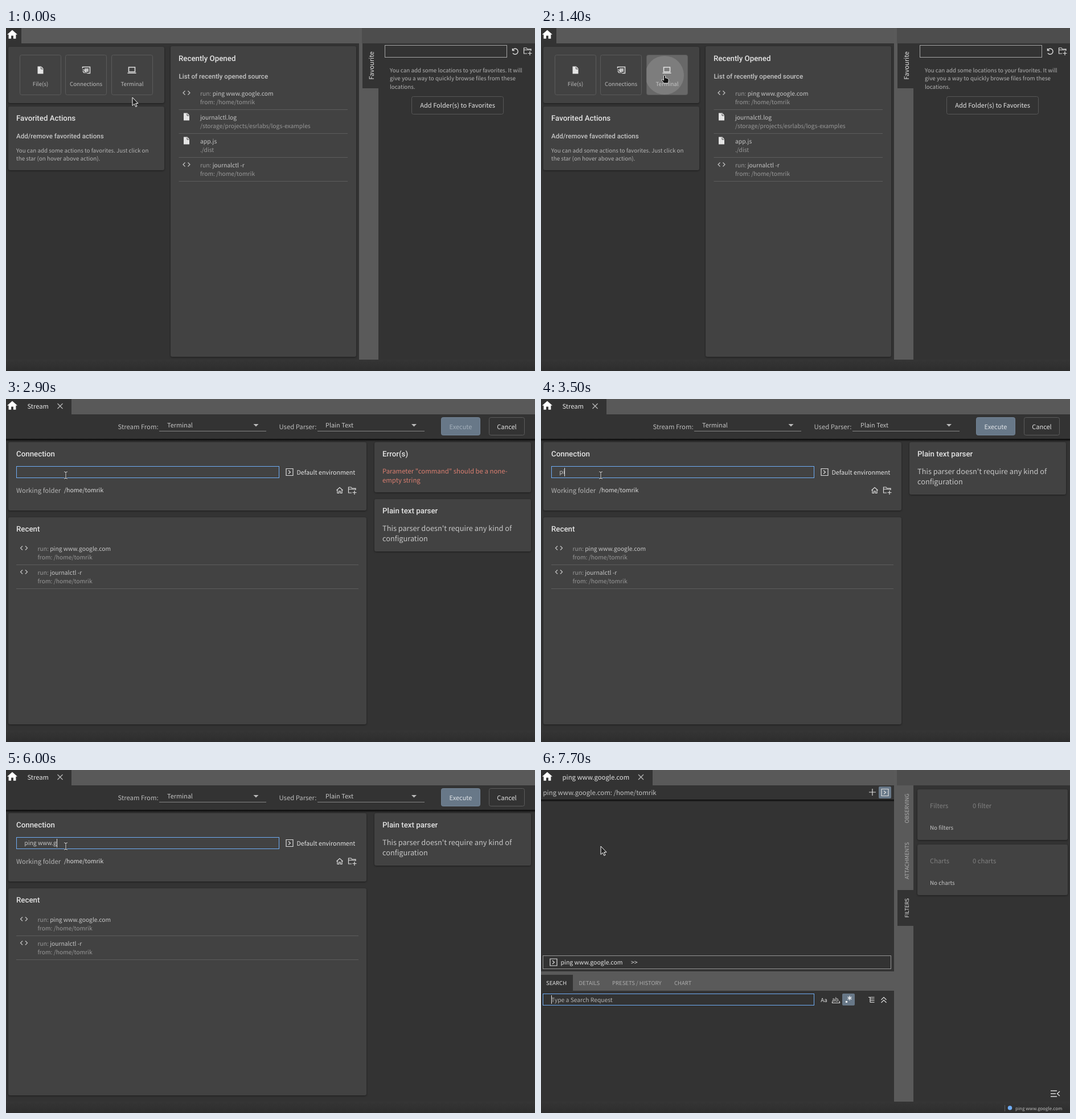
Recreate the animation shown at these times as an HTML page. Size 929 by 603 pixels, loop 8000 ms.

```html
<!DOCTYPE html>
<html lang="en">
<head>
<meta charset="utf-8">
<title>Terminal stream</title>
<style>
  html, body { margin: 0; width: 100%; height: 100%; overflow: hidden; background: #333; }
  svg { display: block; width: 929px; height: 603px; }
  text { font-family: "Noto Sans CJK JP", "Noto Sans CJK SC", "Noto Sans", sans-serif; white-space: pre; text-rendering: geometricPrecision; }
  .head { font-family: Roboto, sans-serif; font-weight: 500; }
  .card { fill: #424242; filter: drop-shadow(0 1px 1.5px rgba(0, 0, 0, .45)); }
  .icon { fill: none; stroke: #ddd; stroke-width: 1.2; }
</style>
</head>
<body>
<svg id="stage" viewBox="0 0 929 603"></svg>
<script>
const stage = document.getElementById('stage');
const FOLDER = '/home/tomrik', COMMAND = 'ping www.google.com';
const BRIGHT = '#e4e4e4', PLAIN = '#c6c6c6', MUTED = '#989898', BAR = '#595959', DARK = '#333', BLUE = '#6fadf5';

// Drawing helpers: each returns SVG markup.
const text = (x, y, size, fill, content, attrs = '') =>
  `<text x="${x}" y="${y}" font-size="${size}" fill="${fill}" ${attrs}>${content}</text>`;
const head = (x, y, content, size = 13.3, fill = BRIGHT) => text(x, y, size, fill, content, 'class="head"');
const middle = (x, y, size, fill, content) => text(x, y, size, fill, content, 'text-anchor="middle"');
const upright = (y, size, fill, content) =>
  text(0, 0, size, fill, content, `text-anchor="middle" transform="translate(645.5 ${y}) rotate(-90)"`);
const rect = (x, y, right, bottom, fill, attrs = '') =>
  `<rect x="${x}" y="${y}" width="${right - x}" height="${bottom - y}" fill="${fill}" ${attrs}/>`;
const frame = (x, y, right, bottom, stroke, fill = 'none', attrs = '') =>
  rect(x + .5, y + .5, right - .5, bottom - .5, fill, `stroke="${stroke}" ${attrs}`);
const card = (x, y, right, bottom) => rect(x, y, right, bottom, '#424242', 'class="card" rx="3"');
const line = (x, y, right, stroke = '#5d5d5d') => `<path d="M${x} ${y}H${right}" stroke="${stroke}"/>`;
const icon = (x, y, d, attrs = '') => `<path class="icon" transform="translate(${x} ${y})" d="${d}" ${attrs}/>`;
const solid = (x, y, d, fill = BRIGHT) => `<path transform="translate(${x} ${y})" d="${d}" fill="${fill}"/>`;
const group = (id, content) => `<g id="${id}">${content}</g>`;

const angles = (x, y) => icon(x, y, 'M-2.5 -3.5L-6 0L-2.5 3.5M2.5 -3.5L6 0L2.5 3.5', 'style="stroke:#c4c4c4"');
const page = (x, y, scale = 1) =>
  `<g transform="translate(${x} ${y}) scale(${scale})">${solid(0, 0, 'M-5 -6.5H1.5L5 -2.8V6.5H-5Z')}<path d="M1 -5.5V-2H4.5" fill="none" stroke="#424242"/></g>`;
const folderPlus = (x, y) => icon(x, y, 'M-1 5H-6.5V-5H-2L-.5 -3H6V0M-6.5 -1.5H6M4 1V8M.5 4.5H7.5');
const prompt = (x, y) => icon(x, y, 'M-6 -6H6V6H-6ZM-2 -3L1.5 0L-2 3');
const cross = x => icon(x, 12.5, 'M-4.5 -4.5L4.5 4.5M4.5 -4.5L-4.5 4.5', 'style="stroke:#bbb"');
const dropdown = (x, y) => solid(x, y, 'M-4.5 -2H4.5L0 2.5Z', '#bbb');

const entry = (x, y, label, detail, mark, right) =>
  mark(x + 13.5, y - 5) + text(x + 37.5, y, 10.3, PLAIN, label) +
  text(x + 37.5, y + 15.2, 10.3, MUTED, detail) + line(x, y + 24.5, right);
const run = command => `<tspan fill="${MUTED}">run: </tspan>${command}`;
const recentRun = (x, y, command, right) => entry(x, y, run(command), 'from: ' + FOLDER, angles, right);

const sideBars = rect(625, 0, 929, 27, '#4d4d4d') + rect(620, 0, 654, 583, '#5a5a5a') + rect(625, 0, 654, 27, '#4d4d4d');

const tile = (x, label, mark, id) =>
  frame(x, 47, x + 73, 118, '#5b5b5b', '#424242', `rx="3" id="${id}"`) + mark + middle(x + 36.5, 102, 9.75, '#bcbcbc', label);

const homeScene = sideBars + rect(626, 27, 654, 106, DARK) + upright(66, 11.3, BRIGHT, 'Favourite') +
  card(4, 33, 278, 132) +
  tile(24, 'File(s)', page(60.5, 74), 'files') +
  tile(104, 'Connections', icon(141, 74, 'M-6.5 -3V-5.5H6.5V5.5H1.5M-6.5 -.5Q-.5 -.5 -.5 5.5M-6.5 2.5Q-3.5 2.5 -3.5 5.5', 'style="stroke-width:1.5"') +
    rect(138, 71, 145, 77, BRIGHT, 'opacity=".75"'), 'links') +
  tile(185, 'Terminal', icon(221, 74, 'M-5.5 -5H5.5V3H-5.5ZM-7.5 5.2H7.5', 'style="stroke-width:1.6"'), 'terminal') +
  '<clipPath id="tileClip"><rect x="185" y="47" width="73" height="71" rx="3"/></clipPath>' +
  '<circle id="ripple" cx="217" cy="83" fill="#fff" fill-opacity=".14" clip-path="url(#tileClip)"/>' +
  card(4, 138, 278, 250) + head(18, 163, 'Favorited Actions') +
  head(18, 193.5, 'Add/remove favorited actions', 11.55, PLAIN) +
  text(18, 219, 9.8, '#b4b4b4', 'You can add some actions to favorites. Just click on') +
  text(18, 233.3, 9.8, '#b4b4b4', 'the star (on hover above action).') +
  card(289, 32, 615, 578) + head(303, 58, 'Recently Opened') +
  head(303.5, 88.5, 'List of recently opened source', 11.6, PLAIN) +
  recentRun(303.5, 119, COMMAND, 600) +
  entry(303.5, 161, 'journalctl.log', '/storage/projects/esrlabs/logs-examples', page, 600) +
  entry(303.5, 203, 'app.js', './dist', page, 600) +
  recentRun(303.5, 245, 'journalctl -r', 600) +
  frame(665, 30, 880, 52, '#a5a5a5') +
  icon(894, 41, 'M-4.5 -5V-1.5H-1M-4.5 -1.8A5 5 0 1 1 -4 3.2', 'style="stroke-width:1.4"') + folderPlus(916, 40) +
  ['You can add some locations to your favorites. It will', 'give you a way to quickly browse files from these', 'locations.']
    .map((row, i) => text(674, 78 + 14.3 * i, 9.8, '#b4b4b4', row)).join('') +
  frame(712, 120, 874, 152, '#575757', 'none', 'rx="3"') + middle(793, 140.3, 11.1, BRIGHT, 'Add Folder(s) to Favorites');

const select = (x, label, labelX, value, arrowX) => text(labelX, 52.5, 11.3, '#bcbcbc', label) +
  text(x + 14, 50, 10.9, PLAIN, value) + line(x, 56.5, x + 188, '#858585') + dropdown(arrowX, 46);

const parser = card(647, 176, 922, 268) + head(661, 201, 'Plain text parser') +
  text(661, 232, 12.75, PLAIN, "This parser doesn't require any kind of") + text(661, 250, 12.75, PLAIN, 'configuration');

const formScene = rect(27, 0, 115, 27, DARK) + text(37.5, 16.5, 11.2, BRIGHT, 'Stream') + cross(95) +
  select(269, 'Stream From:', 196.5, 'Terminal', 439) + select(547, 'Used Parser:', 479.5, 'Plain Text', 716.5) +
  frame(764, 32, 833, 64, '#748496', '#687888', 'rx="3"') + middle(798.5, 52.5, 11, BRIGHT, '<tspan id="execute">Execute</tspan>') +
  frame(848, 32, 911, 64, '#5c5c5c', 'none', 'rx="3"') + middle(879.5, 52.5, 11, BRIGHT, 'Cancel') +
  rect(0, 70, 929, 75, 'url(#shade)') +
  card(4, 76, 633, 196) + head(18, 101, 'Connection') +
  frame(18, 118, 480, 139, '#9c9c9c', '#424242', 'id="input"') +
  text(32.3, 132.4, 10.3, PLAIN, '', 'id="typed"') + rect(32, 121, 33, 136, BRIGHT, 'id="caret"') +
  prompt(498, 128.5) + text(510.5, 132.7, 10.7, BRIGHT, 'Default environment') +
  text(18, 164.8, 11.4, '#b4b4b4', 'Working folder') + text(102, 164.3, 10.5, '#dcdcdc', FOLDER) +
  icon(586, 160.5, 'M-5.5 0L0 -5L5.5 0M-4 -1V5H-1.3V1.5H1.3V5H4V-1') + folderPlus(608, 160) +
  card(4, 208, 633, 572) + head(18, 233, 'Recent') +
  recentRun(18, 267, COMMAND, 619) + recentRun(18, 309, 'journalctl -r', 619) +
  group('errors', card(647, 76, 922, 164) + head(661, 101, 'Error(s)') +
    text(661, 130.5, 11.4, '#d97e70', 'Parameter "command" should be a none-') + text(661, 146.5, 11.4, '#d97e70', 'empty string')) +
  group('parser', parser);

const summary = (y, name, count) => card(661, y, 925, y + 89) + text(683, y + 33, 11.2, '#808080', name) +
  text(758, y + 33, 11.2, '#808080', count) + text(683, y + 70.5, 9.8, PLAIN, 'No ' + name.toLowerCase());

const streamScene = sideBars + rect(27, 0, 196, 27, DARK) + text(37.5, 16.5, 11.35, BRIGHT, COMMAND) + cross(175.5) +
  text(3.5, 44, 11.4, '#c0c0c0', `${COMMAND}: ${FOLDER}`) +
  icon(582, 39, 'M-6 0H6M0 -6V6') + rect(593, 29, 615, 50, '#687888', 'rx="2"') + prompt(604, 39.5) +
  rect(0, 52, 620, 56, 'url(#shade)') +
  frame(3, 326, 615, 350, '#959595') + prompt(22, 338) + text(34.5, 342.2, 10.5, BRIGHT, COMMAND) + text(158, 342.2, 10.5, BRIGHT, '&gt;&gt;') +
  rect(0, 354, 625, 388, '#5a5a5a') + rect(0, 360, 56, 388, DARK) +
  [[9, 'SEARCH', BRIGHT], [66.5, 'DETAILS', '#adadad'], [125, 'PRESETS / HISTORY', '#adadad'], [234, 'CHART', '#adadad']]
    .map(([x, label, fill]) => text(x, 378, 9.5, fill, label)).join('') +
  frame(3, 393, 480, 414, BLUE) + text(18, 407.6, 10.3, '#b4b4b4', 'Type a Search Request') + rect(18, 396, 19, 411, BRIGHT) +
  middle(497, 407.5, 9.6, BRIGHT, 'Aa') + middle(518, 407, 9.6, BRIGHT, 'ab.') + icon(518, 409, 'M-6.5 -2V.5H6.5V-2') +
  rect(529, 393, 551, 414, '#687888', 'rx="2"') + rect(535, 406, 538, 409, '#fff') +
  icon(542, 401, 'M0 -4V4M-3.5 -2L3.5 2M3.5 -2L-3.5 2', 'style="stroke:#fff"') +
  icon(580, 404, 'M-5 -4.5H5.5M-2 -1.5H5.5M-2 1.5H5.5M-2 4.5H5.5M-2 -4.5V4.5') +
  icon(602, 404, 'M-4.5 0L0 -4.5L4.5 0M-4.5 5L0 .5L4.5 5') +
  rect(626, 211, 654, 274, DARK) + upright(67.5, 9.5, '#adadad', 'OBSERVING') +
  upright(159.5, 9.4, '#adadad', 'ATTACHMENTS') + upright(242.5, 9.3, BRIGHT, 'FILTERS') +
  summary(34, 'Filters', '0 filter') + summary(131, 'Charts', '0 charts') +
  icon(903, 569, 'M-8 -5H3M-8 0H1M-8 5H3M8 -4L3.5 0L8 4', 'style="stroke-width:1.4"') +
  rect(814, 589, 815, 600, '#5a5a5a') + '<circle cx="823.5" cy="594" r="3.8" fill="' + BLUE + '"/>' + text(833, 597.5, 7.95, '#bcbcbc', COMMAND);

const cursors =
  group('arrow', '<path d="M0 0V14.5L3.4 11.4L5.8 16.5L8 15.4L5.7 10.5H10Z" fill="#222" stroke="#fff"/>') +
  group('hand', '<path d="M-1.5 .5Q0 -1.5 1.5 .5V4.5Q3 3.5 4 5Q5.5 4.5 6 6Q7.5 6 7.2 8L6.5 13.5H-1.5Q-3 10.5 -5 8.5Q-5.5 6.5 -3.5 7L-1.5 8.5Z" fill="#111" stroke="#fff" stroke-width=".8"/>') +
  group('beam', '<path d="M-3 -6H-1L0 -5L1 -6H3M0 -5V5M-3 6H-1L0 5L1 6H3" fill="none" stroke="#222" stroke-width="2.6"/><path d="M-3 -6H-1L0 -5L1 -6H3M0 -5V5M-3 6H-1L0 5L1 6H3" fill="none" stroke="#eee"/>');

stage.innerHTML =
  '<defs><linearGradient id="shade" x2="0" y2="1"><stop stop-color="#0a0a0a"/><stop offset=".35" stop-color="#161616"/><stop offset="1" stop-color="#333"/></linearGradient>' +
  '<linearGradient id="foot" x2="0" y2="1"><stop stop-color="#353535"/><stop offset="1" stop-color="#2d2d2d"/></linearGradient></defs>' +
  rect(0, 0, 929, 603, DARK) + rect(0, 0, 929, 27, BAR) + rect(0, 0, 27, 27, DARK) + rect(0, 583, 929, 603, 'url(#foot)') +
  group('home', homeScene) + group('form', formScene) + group('stream', streamScene) +
  solid(11, 11.5, 'M0 -8L9 0H6.4V7.2H1.9V2H-1.9V7.2H-6.4V0H-9Z', '#fff') + cursors;

const part = Object.fromEntries([...stage.querySelectorAll('[id]')].map(node => [node.id, node]));
const show = (name, visible) => part[name].setAttribute('display', visible ? 'inline' : 'none');

// [time, typed characters]; every entry also restarts the caret blink.
const keys = [[2300, 0], [3300, 1], [3500, 2], [3600, 3], [3800, 4], [3900, 4], [4700, 6], [4800, 7], [5000, 8], [5200, 9],
  [6000, 10], [6200, 11], [6300, 12], [6400, 13], [6600, 14], [6700, 15], [6900, 16], [7100, 17], [7200, 18], [7300, 19]];
const pointerPath = [[0, 222, 122], [100, 222, 122], [500, 217, 83.5], [1500, 217, 83.5], [1800, 118.5, 183.5], [2100, 105, 134]];

function pointerAt(t) {
  const next = pointerPath.findIndex(([time]) => time > t);
  if (next < 0) return pointerPath.at(-1).slice(1);
  const [t0, x0, y0] = pointerPath[next - 1], [t1, x1, y1] = pointerPath[next];
  const k = (t - t0) / (t1 - t0);
  return [x0 + (x1 - x0) * k, y0 + (y1 - y0) * k];
}

function render(now) {
  const t = Math.floor(now % 8000 / 100) * 100;
  const home = t < 1500, stream = t >= 7700, form = !home && !stream;
  show('home', home);
  show('form', form);
  show('stream', stream);

  const pressed = t >= 1300;
  part.terminal.setAttribute('fill', pressed ? '#686868' : '#424242');
  part.ripple.setAttribute('r', pressed ? 14 + (t - 1300) * .2 : 0);

  const [keyTime, count] = keys.findLast(([time]) => time <= t) || [Infinity, 0];
  const focused = t >= 2300, valid = count > 0;
  part.input.setAttribute('stroke', focused ? BLUE : '#9c9c9c');
  part.execute.setAttribute('fill', valid ? '#e0e4e8' : '#a3afba');
  show('errors', !valid);
  part.parser.setAttribute('transform', `translate(0 ${valid ? -100 : 0})`);
  part.typed.textContent = COMMAND.slice(0, count);
  show('caret', focused && t - keyTime < 600);
  if (form) part.caret.setAttribute('x', Math.round(32 + (count ? part.typed.getComputedTextLength() : 0)));

  const [x, y] = pointerAt(t);
  const beam = form && t >= 2100, hand = home && t >= 400;
  show('beam', beam);
  show('hand', hand);
  show('arrow', !beam && !hand);
  for (const name of ['arrow', 'hand', 'beam']) part[name].setAttribute('transform', `translate(${x} ${y})`);
}

const start = performance.now();
function tick() {
  render(performance.now() - start);
  requestAnimationFrame(tick);
}
tick();
</script>
</body>
</html>
```
